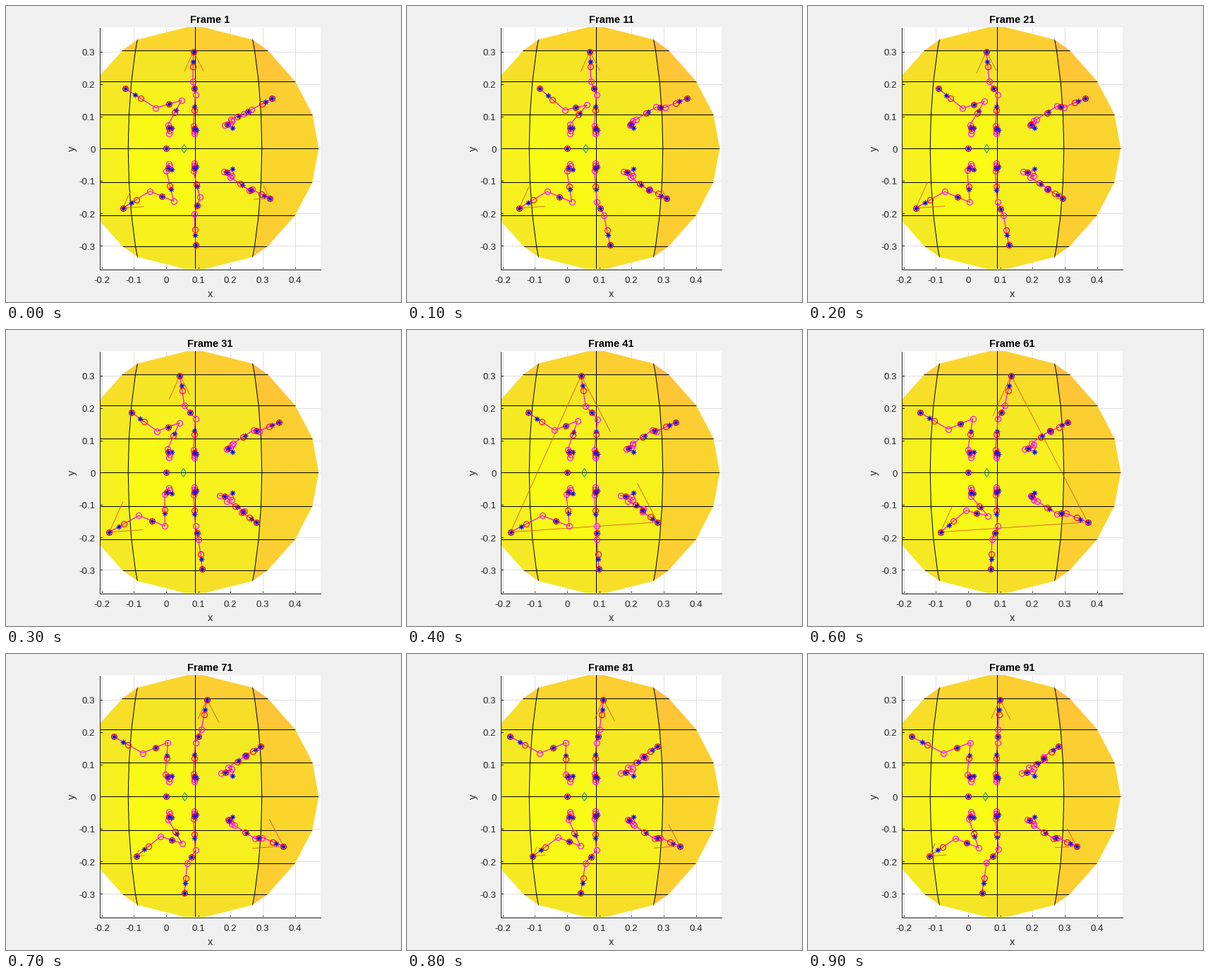
Recreate the animation shown at these times as a matplotlib script. Size 560x420 px, loop 1000 ms.

```python
import numpy as np
import matplotlib.pyplot as plt
from matplotlib.animation import FuncAnimation
from matplotlib.patches import Polygon

W, H, DPI = 560, 420, 100
PX = 72 / DPI                      # points per pixel
STEPS = 10
UNIT = 457                         # pixels per data unit
X0, Y0 = 227, 202.4                # data origin
CX = 268.5                         # dome centre
RADIUS = 0.671 * UNIT
FONT = "Liberation Sans"

fig = plt.figure(figsize=(W / DPI, H / DPI), dpi=DPI, facecolor="#f0f0f0")
ax = fig.add_axes([133 / W, 47 / H, 313 / W, 343 / H])
ax.set(xlim=(133.5, 446.5), ylim=(373.5, 30.5), xticks=[], yticks=[])
for spine in ax.spines.values():
    spine.set_visible(False)


def label(x, y, text, size=13.33, **kw):
    kw = {"ha": "center", "va": "baseline", "color": "#262626", **kw}
    return fig.text(x / W, 1 - y / H, text, family=FONT,
                    fontsize=size * PX, **kw)


def rule(xs, ys, color="black", z=2, width=1, **kw):
    return ax.plot(xs, ys, color=color, lw=width * PX, zorder=z, **kw)[0]


# Axes, grid and labels
for i in range(-2, 5):
    x = round(X0 + i * UNIT / 10)
    rule([x, x], [31, 374], "#dfdfdf", 0)
    rule([x, x], [374, 371], "#262626", 3)
    label(x, 393, f"{i / 10:g}")
for i in range(-3, 4):
    y = round(Y0 - i * UNIT / 10)
    rule([133, 446], [y, y], "#dfdfdf", 0)
    rule([133, 136], [y, y], "#262626", 3)
    label(126.5, y + 5.5, f"{i / 10:g}", ha="right")
rule([133, 133, 446], [31, 374, 374], "#262626", 3, clip_on=False)
label(289.5, 413, "x", 14.67)
label(93.5, 202, "y", 14.67, rotation=90, va="center")
title = label(289.5, 24, "", 14.67, color="black", weight="bold")


# Dome: flat-coloured facets, cut off at a constant height
def dome(lat, lon):
    a, b = np.radians(lat), np.radians(lon)
    return CX + RADIUS * np.cos(a) * np.sin(b), Y0 - RADIUS * np.sin(a)


def height_color(lat, lon):
    level = 31.5 * (1 + np.cos(np.radians(lat)) * np.cos(np.radians(lon)))
    stops = [52, 54, 56, 58, 60, 63]
    channels = ([.987, .997, .989, .968, .960, .977],
                [.735, .766, .814, .864, .914, .984],
                [.255, .220, .189, .164, .142, .081])
    return [np.interp(level, stops, c) for c in channels]


quarter = np.array([(0, 174.8), (81.5, 154.3), (103, 139), (142, 95),
                    (166.5, 48), (175.3, 0)])
right = np.vstack([quarter, quarter[::-1] * (1, -1)])
outline = np.vstack([right, right[::-1] * (-1, 1)]) + (CX, Y0)
rim = Polygon(outline, transform=ax.transData)


def cut(artist):
    artist.set_clip_path(rim)
    artist.set_clip_box(ax.bbox)


LATS, LONS = range(-36, 37, 9), range(-36, 37, 18)
for lat in LATS[:-1]:
    for lon in LONS[:-1]:
        corners = [dome(lat + a, lon + b)
                   for a, b in ((0, 0), (0, 18), (9, 18), (9, 0))]
        color = height_color(lat + 9, lon + 18)
        cut(ax.add_patch(Polygon(corners, fc=color, ec=color, lw=.3, zorder=1)))
for lat in LATS:
    cut(rule(*np.transpose([dome(lat, lon) for lon in (-50, 50)])))
for lon in LONS[1:-1]:
    cut(rule(*np.transpose([dome(lat, lon) for lat in LATS])))

# Gait, in steps of the cycle: the foot lifts, swings forward, lands, drags back
LIFT, LAND = 3.5, 6.3
REAR, FRONT = -23.7, 22.3          # foot travel in pixels


def gait(step):
    """Forward offset of the foot and how high it is raised (0 to 1)."""
    step %= STEPS
    if LIFT < step < LAND:
        u = (step - LIFT) / (LAND - LIFT)
        return REAR + (FRONT - REAR) * (1 - np.cos(np.pi * u)) / 2, np.sin(np.pi * u)
    u = (step - LAND) % STEPS / (STEPS - LAND + LIFT)
    return FRONT + (REAR - FRONT) * u, 0


# Each leg: (x, distance from the body axis) of base joints, extra joints,
# hip, knee, shin, foot and one fixed point
def hind(step):
    s, lift = gait(step)
    kx = 239 + .64 * s + 9 * lift
    knee_out = 76.5 - .0232 * (kx - 230) ** 2
    hip = (228 + .2 * (kx - 239), 32 + .1 * (kx - 239))
    shin = (205.5 + .81 * s + 6 * lift, 54.5 + .48 * (knee_out - 62))
    return ([(231, 21.5), (232.3, 25)], [], hip, (kx, knee_out), shin,
            (167.5 + s, 84.7), (235.8, 29.5))


def middle(step):
    s, lift = gait(step + STEPS / 2)
    return ([(267.8, 21), (267.8, 24.3)], [], (266.2, 32),
            (269 + 6.5 * lift ** 2, 76.3 - 7 * lift ** 3),
            (266.3 + .63 * s, 94.7 - 1.5 * lift ** 3),
            (267.5 + s, 137.4), (270.6, 25.8))


def fore(step):
    s, lift = gait(step)
    knee_out = 60 - .013 * min(s, 0) ** 2 - 11 * lift ** 2
    return ([(309.7 + .32 * s, 32.7), (318.5, 35)], [(320.5, 39)],
            (319.3 + .29 * s, 41),
            (346.5 + .4 * s - 10 * lift ** 2, knee_out),
            (350.4 + .76 * s - 3 * lift ** 2, 58.5 - .3 * (60 - knee_out)),
            (376 + s, 70.7), (321.5, 29))


def between(a, b, t):
    return tuple(np.add(a, t * np.subtract(b, a)))


def leg(parts, side):
    """Joints, foot, red and blue points; side is 1 below the axis, -1 above."""
    base, extra, hip, knee, shin, foot, fixed = parts
    socket = between(*base, .5) if extra else between(base[1], hip, .5)
    shared = [socket, between(knee, shin, .5), foot]
    red = shared + [between(hip, knee, .5), between(shin, foot, .5)]
    blue = shared + [between(hip, knee, .6), between(shin, foot, 2 / 3), fixed]
    groups = [*base, *extra, hip, knee, shin], [foot], red, blue
    return [np.array(pts) * (1, side) + (0, 202.5) for pts in groups]


def support(step):
    """Triangle between three feet, hidden where it sinks below the dome."""
    s, lift = gait(step)
    feet = np.array([(267.5, 65), (167.5, 287.2), (376, 273.2)]) + (s, 0)
    t = np.linspace(0, 1, 240)[:, None]
    edges = []
    for p, q in ((0, 1), (1, 2), (2, 0)):
        edge = feet[p] + t * (feet[q] - feet[p])
        distance = np.hypot(*(edge - (CX, Y0)).T)
        edge[distance < 110 * (1 - .85 * lift)] = np.nan
        edges.append(edge)
    return np.vstack(edges)


def markers(shape, color, size, z, width=1):
    return ax.plot([], [], ls="none", marker=shape, mfc="none", mec=color,
                   ms=size * PX, mew=width * PX, zorder=z)[0]


triangle = rule([], [], "#d95319", 4, .8)
chains = [rule([], [], "magenta", 5, 1.2) for _ in range(6)]
joint_dots = markers("o", "magenta", 8, 6, 1.1)
red_dots = markers("o", "red", 8, 8, 1.1)
blue_stars = markers((8, 2, 0), "blue", 7.5, 7, .9)
mass_center = markers("d", "#00a08c", 8.5, 6)


def draw(k):
    title.set_text(f"Frame {STEPS * k + 1}")
    triangle.set_data(*support(k).T)
    origin = np.array([(227, 202.5)])
    joints, reds, blues = [], [origin], [origin]
    specs = [(limb, side) for side in (1, -1) for limb in (hind, middle, fore)]
    for line, (limb, side) in zip(chains, specs):
        step = k if side == 1 else k + STEPS / 2
        chain, foot, red, blue = leg(limb(step), side)
        line.set_data(*np.vstack([chain, foot]).T)
        joints.append(chain)
        reds.append(red)
        blues.append(blue)
    for dots, pts in ((joint_dots, joints), (red_dots, reds), (blue_stars, blues)):
        dots.set_data(*np.vstack(pts).T)
    mass_center.set_data([252.5 + 1.05 * np.sin(4 * np.pi * k / STEPS)], [202.5])
    return [title, triangle, *chains, joint_dots, red_dots, blue_stars, mass_center]


anim = FuncAnimation(fig, draw, frames=STEPS, interval=100, repeat=True,
                     repeat_delay=0)
plt.show()
```
